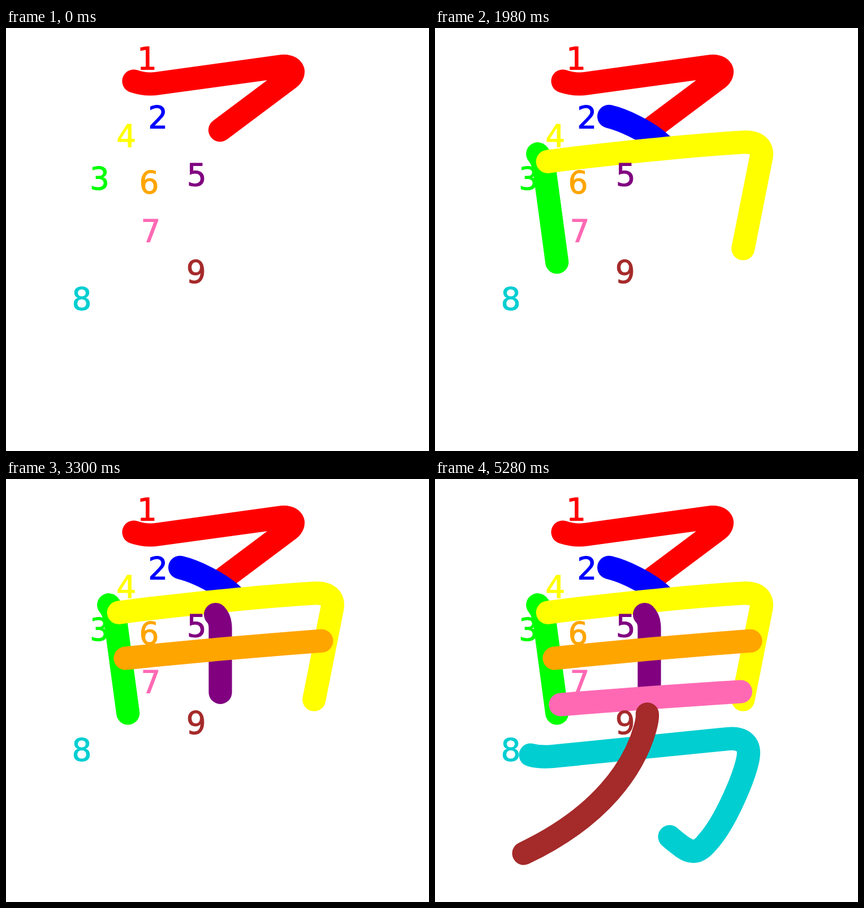
Recreate the animation shown at these times as an HTML page. Size 748 by 748 pixels, loop 5.94 s.

```html
<!DOCTYPE html>
<html lang="en">
<head>
<meta charset="utf-8">
<title>Stroke order</title>
<style>
  html, body { margin: 0; width: 100%; height: 100%; overflow: hidden; background: #fff; }
  svg { display: block; width: 100%; height: 100%; }
  path { fill: none; stroke-width: 41.2; stroke-linecap: round; stroke-linejoin: round; }
  text { font: 55px "DejaVu Sans", sans-serif; text-anchor: middle; stroke-width: 1; }
</style>
</head>
<body>
<svg viewBox="0 0 748 748"></svg>
<script>
const STEP = 660;

// Each stroke: colour, label x, label baseline, path
const strokes = [
  ["red", 249.5, 73, "M226 94C238 98 252 100.5 268 98L483 68.5C508 64 514 79 500 89.5L378.5 180.5"],
  ["blue", 268.7, 177, "M307.6 156.4C331 162 377 182 401.3 206.2"],
  ["lime", 165.5, 285, "M181.7 222.7C189 231 192.5 244 194.5 257L215.7 414"],
  ["yellow", 212.7, 210, "M199.3 236.2C300 223 450 207.5 545 202C570 200.5 580 212 577 228L544.8 390"],
  ["purple", 337.3, 279, "M370.6 239.6C376 245 379 252 379 264V377.3"],
  ["orange", 253, 292, "M211 317Q385 299 558 286.3"],
  ["hotpink", 256, 378, "M222 399Q381 386 540.4 376"],
  ["darkturquoise", 134, 498, "M169 488C180 491 193 492 208 490.5L518 459.5C546 457 558 470 553.5 494C547 528 513 608 482 642C470 657 458 665 438 651C430 645 422 639 415 632.6"],
  ["brown", 336.3, 450, "M375.4 415.8C376 423 374 432 371.5 441C352 510 294 597 157 662"]
];

const svg = document.querySelector("svg");

function add(tag, attributes) {
  const node = document.createElementNS(svg.namespaceURI, tag);
  for (const name in attributes) node.setAttribute(name, attributes[name]);
  return svg.appendChild(node);
}

const paths = strokes.map(([color, , , d]) => add("path", { d, stroke: color }));
strokes.forEach(([color, x, y], i) => {
  add("text", { x, y, fill: color, stroke: color }).textContent = i + 1;
});

const start = performance.now();

function draw(now) {
  const elapsed = Math.max(0, now - start) % (STEP * strokes.length);
  const current = Math.floor(elapsed / STEP);
  paths.forEach((path, i) => path.style.display = i <= current ? "" : "none");
  requestAnimationFrame(draw);
}
draw(start);
</script>
</body>
</html>
```
